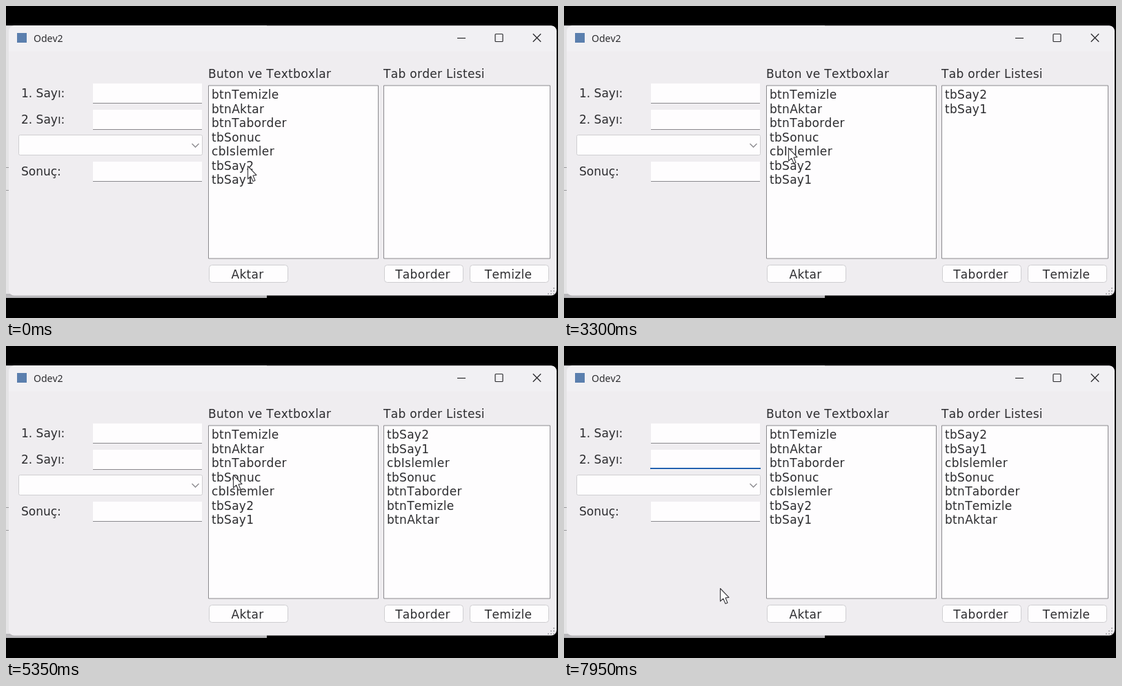
These frames come from a looping animation (800x451 px, 8 s). An HTML page with a canvas:

```html
<!DOCTYPE html>
<html lang="tr">
<head>
<meta charset="utf-8">
<title>Odev2</title>
<style>
html, body { margin: 0; width: 100%; height: 100%; overflow: hidden; background: #000; }
canvas { display: block; width: 800px; height: 451px; }
</style>
</head>
<body>
<canvas id="stage" width="800" height="451"></canvas>
<script>
const ctx = document.getElementById('stage').getContext('2d');
const LOOP = 8000;
const FORM_FONT = '17px "DejaVu Sans", sans-serif';
const UI_FONT = '"Noto Sans", "Open Sans", sans-serif';
const INK = '#2d2d30';
const FACE = '#efedf0';
const PAPER = '#fefdfe';
const EDGE = '#8b8a8e';
const ROW = 20.5;

const items = ['btnTemizle', 'btnAktar', 'btnTaborder', 'tbSonuc', 'cbIslemler', 'tbSay2', 'tbSay1'];
const order = ['tbSay2', 'tbSay1', 'cbIslemler', 'tbSonuc', 'btnTaborder', 'btnTemizle', 'btnAktar'];
const dialog = { open: 6050, close: 7250 };
const focusTime = 7900;

// Two unhurried picks, then a steady run; each row is selected briefly before it is copied.
const picks = order.map((name, n) => {
  const copied = n < 2 ? 850 + 1800 * n : 3600 + 390 * (n - 2);
  return { name, row: items.indexOf(name), selected: copied - 200, copied };
});

const stop = (x, y, from, to = from) => ({ x, y, from, to });
const stops = [
  stop(350, 231, 0, 250),
  ...picks.map((p, n) => stop(n < 2 ? 350 : 325, 137 + 17 * p.row, p.selected - 100, p.copied)),
  stop(401, 235, 1500, 2000),
  stop(329, 186, 5350),
  stop(594, 398, dialog.open - 50, 6500),
  stop(327, 395, dialog.close - 100, dialog.close),
  stop(226, 350, 7900, LOOP)
].sort((a, b) => a.from - b.from);

function pointerAt(t) {
  const i = stops.findLastIndex(s => s.from <= t);
  const a = stops[i], b = stops[i + 1];
  if (t <= a.to || !b) return [a.x, a.y];
  const u = (t - a.to) / (b.from - a.to);
  const k = u * u * (3 - 2 * u);
  return [a.x + (b.x - a.x) * k, a.y + (b.y - a.y) * k];
}

function fillRect(x, y, w, h, color) {
  ctx.fillStyle = color;
  ctx.fillRect(x, y, w, h);
}

function box(x, y, w, h, r, fill, stroke, width = 1) {
  ctx.beginPath();
  ctx.roundRect(x, y, w, h, r);
  if (fill) { ctx.fillStyle = fill; ctx.fill(); }
  if (stroke) { ctx.strokeStyle = stroke; ctx.lineWidth = width; ctx.stroke(); }
}

function line(color, width, x, y, ...rest) {
  ctx.strokeStyle = color;
  ctx.lineWidth = width;
  ctx.beginPath();
  ctx.moveTo(x, y);
  for (let i = 0; i < rest.length; i += 2) ctx.lineTo(rest[i], rest[i + 1]);
  ctx.stroke();
}

function cross(x, y, r, color) {
  line(color, 1.3, x - r, y - r, x + r, y + r);
  line(color, 1.3, x + r, y - r, x - r, y + r);
}

function text(str, x, y, { font = FORM_FONT, color = INK, spacing = 0.3, align = 'left' } = {}) {
  ctx.font = font;
  ctx.fontKerning = 'none';
  ctx.fillStyle = color;
  ctx.letterSpacing = spacing + 'px';
  ctx.textAlign = align;
  ctx.fillText(str, x, y);
}

function drawBackdrop() {
  fillRect(0, 0, 800, 451, '#000');
  fillRect(0, 28, 378, 394, '#b9b8bb');
  fillRect(0, 29, 10, 387, '#e5e4e6');
  for (const y of [233, 266]) fillRect(0, y, 4, 1, '#99989b');
}

function drawWindow(active) {
  box(4, 28.5, 794, 390, 8, FACE);
  box(4, 28.5, 794, 37, [8, 8, 0, 0], '#f1f0f3');

  const color = active ? INK : '#8d8c90';
  fillRect(16, 39, 14, 14, '#5b7fae');
  text('Odev2', 40, 52, { font: '14px ' + UI_FONT, color, spacing: 0 });
  line(color, 1.2, 654, 46.5, 666, 46.5);
  box(709, 40.5, 11, 11, 1, null, color, 1.2);
  cross(769.5, 46, 5.7, color);

  for (let row = 0; row < 3; row++)
    for (let col = 2 - row; col < 3; col++)
      fillRect(785 + col * 4, 407 + row * 4, 2, 2, '#b5b4b8');
}

function drawField(label, y, focused) {
  text(label, 22, y + 19.5, { spacing: 0 });
  fillRect(126, y, 158, 29, PAPER);
  if (focused) fillRect(125, y + 26, 160, 2, '#2463b0');
  else fillRect(126, y + 28, 158, 1, EDGE);
}

function drawCombo() {
  box(18.5, 186.5, 266, 29, 2, PAPER, '#cfced1');
  line(EDGE, 1.3, 269.5, 199, 274.5, 204, 279.5, 199);
}

function drawButton(label, x) {
  box(x + 0.5, 374.5, 114, 25, 4, PAPER, '#cfced1');
  text(label, x + 56, 394, { align: 'center' });
}

function drawList(title, x, w, entries, selected) {
  text(title, x, 104);
  box(x + 0.5, 115, w, 250, 0, PAPER, EDGE);
  entries.forEach((entry, i) => {
    const y = 117 + i * ROW;
    const lit = entry === selected;
    if (lit) fillRect(x + 2, y, w - 4, ROW, '#107bd3');
    text(entry, x + 5, y + 17, { color: lit ? '#f6f8fc' : INK });
  });
}

function drawForm(t) {
  drawField('1. Sayı:', 112, false);
  drawField('2. Sayı:', 150, t >= focusTime);
  drawField('Sonuç:', 225, false);
  drawCombo();

  const current = picks.find(p => t >= p.selected && t < p.copied);
  const copied = picks.filter(p => t >= p.copied).map(p => p.name);
  drawList('Buton ve Textboxlar', 293, 246, items, current?.name);
  drawList('Tab order Listesi', 547, 241, copied);

  drawButton('Aktar', 294);
  drawButton('Taborder', 548);
  drawButton('Temizle', 672);
}

function drawDialog() {
  ctx.save();
  ctx.shadowColor = 'rgba(0,0,0,0.38)';
  ctx.shadowBlur = 22;
  ctx.shadowOffsetY = 5;
  box(62.5, 264.5, 331, 157.5, 8, FACE);
  ctx.restore();
  fillRect(63, 301, 330, 71, PAPER);
  box(62.5, 264.5, 331, 157.5, 8, null, '#a5a4a7');
  cross(376, 281.5, 5.7, INK);

  const font = '12px ' + UI_FONT;
  text('Taborder işlemi başarılı bir şekilde gerçekleşti', 76, 342, { font, spacing: 0.5 });
  box(276.5, 384.5, 96.5, 24, 4, PAPER, '#2468b4', 1.3);
  text('Tamam', 324.5, 402, { font, align: 'center' });
}

function drawPointer(x, y) {
  ctx.save();
  ctx.translate(x, y);
  const arrow = new Path2D('M.5 .5V19L4.8 15.2L8 22.5L11 21.2L8 14L13 13.4Z');
  ctx.fillStyle = '#fff';
  ctx.fill(arrow);
  ctx.strokeStyle = '#39383c';
  ctx.lineWidth = 1.1;
  ctx.lineJoin = 'round';
  ctx.stroke(arrow);
  ctx.restore();
}

function render(t) {
  const modal = t >= dialog.open && t < dialog.close;
  drawBackdrop();
  drawWindow(!modal);
  drawForm(t);
  if (modal) drawDialog();
  drawPointer(...pointerAt(t));
}

const start = performance.now();
function tick() {
  render((performance.now() - start) % LOOP);
  requestAnimationFrame(tick);
}
tick();
</script>
</body>
</html>
```
